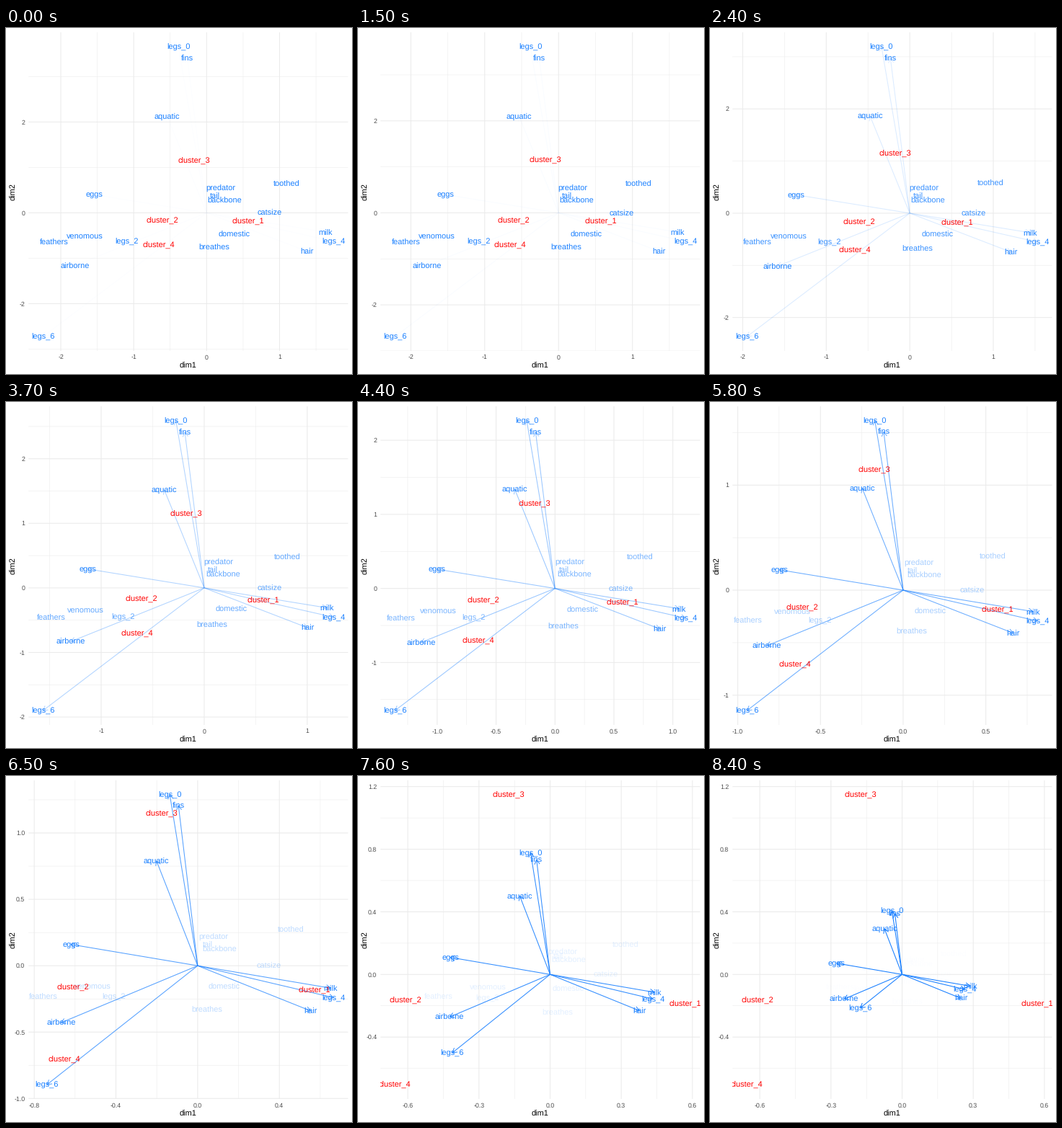
Write a matplotlib script that moves like this. It is 480 by 480 pixels and loops after 10 s.

```python
import math

import matplotlib.pyplot as plt
import numpy as np
from matplotlib.animation import FuncAnimation

plt.rcParams["font.family"] = "Liberation Sans"
plt.rcParams["text.hinting"] = "none"
plt.rcParams["path.snap"] = False

SIZE, DPI = 480, 72
LEFT, RIGHT, TOP, BOTTOM = 31.2, 474.5, 5.5, 448.2
BLUE, RED, GRID, TICK = "#1a80ff", "#ff0000", "#ebebeb", "#4d4d4d"
LABEL_SIZE, TICK_SIZE, LINE = 11.04, 8.8, 1.067
CAP = 0.358  # half the cap height, relative to the font size
HOLD, STEPS, FRAMES, INTERVAL = 14, 70, 100, 100

# name: start x, start y, final shrink factor
ARROWS = {
    "hair": (1.371, -0.843, 0.181),
    "eggs": (-1.545, 0.40, 0.1785),
    "milk": (1.628, -0.422, 0.176),
    "airborne": (-1.807, -1.16, 0.1355),
    "aquatic": (-0.542, 2.124, 0.1378),
    "fins": (-0.265, 3.403, 0.114),
    "legs_0": (-0.388, 3.663, 0.1108),
    "legs_4": (1.740, -0.629, 0.152),
    "legs_6": (-2.244, -2.725, 0.0784),
}
FADING = {
    "feathers": (-2.088, -0.637, 0.125),
    "predator": (0.195, 0.55, 0.173),
    "toothed": (1.094, 0.649, 0.1995),
    "backbone": (0.244, 0.284, 0.235),
    "breathes": (0.101, -0.756, 0.23),
    "venomous": (-1.674, -0.51, 0.047),
    "tail": (0.111, 0.371, 0.22),
    "domestic": (0.378, -0.462, 0.095),
    "catsize": (0.867, 0.0, 0.178),
    "legs_2": (-1.095, -0.62, 0.143),
}
CLUSTERS = {
    "cluster_1": (0.571, -0.185),
    "cluster_2": (-0.609, -0.162),
    "cluster_3": (-0.176, 1.1497),
    "cluster_4": (-0.654, -0.7035),
}


def nice_breaks(lo, hi, m=5):
    """Extended Wilkinson labelling: returns first break, step and count."""
    nice = (1, 5, 2, 2.5, 4, 3)
    span = hi - lo
    best, result = -2, None

    def score(simple, cover, dense):
        return 0.25 * simple + 0.2 * cover + 0.5 * dense + 0.05

    for j in range(1, 50):
        for i, q in enumerate(nice):
            base = 1 - i / (len(nice) - 1) - j
            if score(base + 1, 1, 1) < best:
                return result
            for k in range(2, 50):
                dense_max = 2 - (k - 1) / (m - 1) if k >= m else 1
                if score(base + 1, 1, dense_max) < best:
                    break
                z = math.ceil(math.log10(span / (k + 1) / j / q))
                while True:
                    step = j * q * 10.0 ** z
                    width = step * (k - 1)
                    excess = max(width - span, 0) / 2
                    cover_max = 1 - excess ** 2 / (0.1 * span) ** 2
                    if score(base + 1, cover_max, dense_max) < best:
                        break
                    first = (math.floor(hi / step) - (k - 1)) * j
                    last = math.ceil(lo / step) * j
                    for start in range(first, last + 1):
                        a = start * step / j
                        b = a + width
                        zero = start % j == 0 and a <= 1e-9 and b >= -1e-9
                        cover = 1 - 0.5 * ((hi - b) ** 2 + (lo - a) ** 2) / (0.1 * span) ** 2
                        r = (k - 1) / width
                        rt = (m - 1) / (max(b, hi) - min(a, lo))
                        total = score(base + zero, cover, 2 - max(r / rt, rt / r))
                        if total > best:
                            best, result = total, (a, step, k)
                    z += 1
    return result


def axis_breaks(lo, hi):
    a, step, count = nice_breaks(lo, hi)
    major = [round(a + i * step, 9) + 0.0 for i in range(count)]
    minor = [a + (i - 0.5) * step for i in range(count + 1)]
    major = [v for v in major if lo <= v <= hi]
    minor = [v for v in minor if lo <= v <= hi]
    digits = next(d for d in range(7)
                  if all(abs(round(v, d) - v) < 1e-7 for v in major))
    return major, minor, [f"{v:.{digits}f}" for v in major]


def expanded(values):
    pad = 0.05 * (max(values) - min(values))
    return min(values) - pad, max(values) + pad


def shrink(points, t):
    return {name: (x * (1 - t * (1 - r)), y * (1 - t * (1 - r)))
            for name, (x, y, r) in points.items()}


fig = plt.figure(figsize=(SIZE / DPI, SIZE / DPI), dpi=DPI, facecolor="white")
ax = fig.add_axes([LEFT / SIZE, 1 - BOTTOM / SIZE,
                   (RIGHT - LEFT) / SIZE, (BOTTOM - TOP) / SIZE])


def write(x, y, text, size=LABEL_SIZE, color="black", clip=False, ha="center", **kw):
    ax.text(x, y, text, fontsize=size, color=color, ha=ha, va="baseline",
            clip_on=clip, **kw)


def stroke(xs, ys, color, width=LINE, alpha=1):
    ax.plot(xs, ys, color=color, lw=width, alpha=alpha,
            solid_capstyle="butt", solid_joinstyle="round")


def arrow(x0, y0, x1, y1, alpha):
    stroke([x0, x1], [y0, y1], BLUE, alpha=alpha)
    back = math.atan2(y0 - y1, x0 - x1)
    wings = [back - math.pi / 6, back + math.pi / 6]
    (ax0, ay0), (ax1, ay1) = [(x1 + 7.2 * math.cos(w), y1 + 7.2 * math.sin(w))
                              for w in wings]
    stroke([ax0, x1, ax1], [ay0, y1, ay1], BLUE, alpha=alpha)


def draw(frame):
    t = min(max(frame - HOLD, 0), STEPS) / STEPS
    ax.clear()
    ax.axis("off")
    ax.set_xlim(LEFT, RIGHT)
    ax.set_ylim(BOTTOM, TOP)

    arrows, fading = shrink(ARROWS, t), shrink(FADING, t)
    points = [*arrows.values(), *fading.values(), *CLUSTERS.values()]
    x_lo, x_hi = expanded([p[0] for p in points])
    y_lo, y_hi = expanded([p[1] for p in points])

    def px(x):
        return LEFT + (x - x_lo) / (x_hi - x_lo) * (RIGHT - LEFT)

    def py(y):
        return BOTTOM - (y - y_lo) / (y_hi - y_lo) * (BOTTOM - TOP)

    x_major, x_minor, x_text = axis_breaks(x_lo, x_hi)
    y_major, y_minor, y_text = axis_breaks(y_lo, y_hi)
    for xs, ys, width in ((x_minor, y_minor, LINE / 2), (x_major, y_major, LINE)):
        for y in ys:
            stroke([LEFT, RIGHT], [py(y)] * 2, GRID, width)
        for x in xs:
            stroke([px(x)] * 2, [TOP, BOTTOM], GRID, width)

    show, fade = 0.01 + 0.99 * t, 1 - 0.99 * t
    for x, y in arrows.values():
        arrow(px(0), py(0), px(x), py(y), show)
    for group, color, alpha in ((fading, BLUE, fade), (arrows, BLUE, 1), (CLUSTERS, RED, 1)):
        for name, (x, y) in group.items():
            write(px(x), py(y) + CAP * LABEL_SIZE, name, color=color,
                  alpha=alpha, clip=True)

    for x, text in zip(x_major, x_text):
        write(px(x), BOTTOM + 11.3, text, TICK_SIZE, TICK)
    for y, text in zip(y_major, y_text):
        write(LEFT - 4.95, py(y) + CAP * TICK_SIZE, text, TICK_SIZE, TICK, ha="right")
    write((LEFT + RIGHT) / 2, 472.3, "dim1", 11)
    ax.text(13.4, (TOP + BOTTOM) / 2, "dim2", fontsize=11, color="black",
            rotation=90, rotation_mode="anchor", ha="center", va="baseline")
    return []


anim = FuncAnimation(fig, draw, frames=FRAMES, interval=INTERVAL, repeat=True)
plt.show()
```
